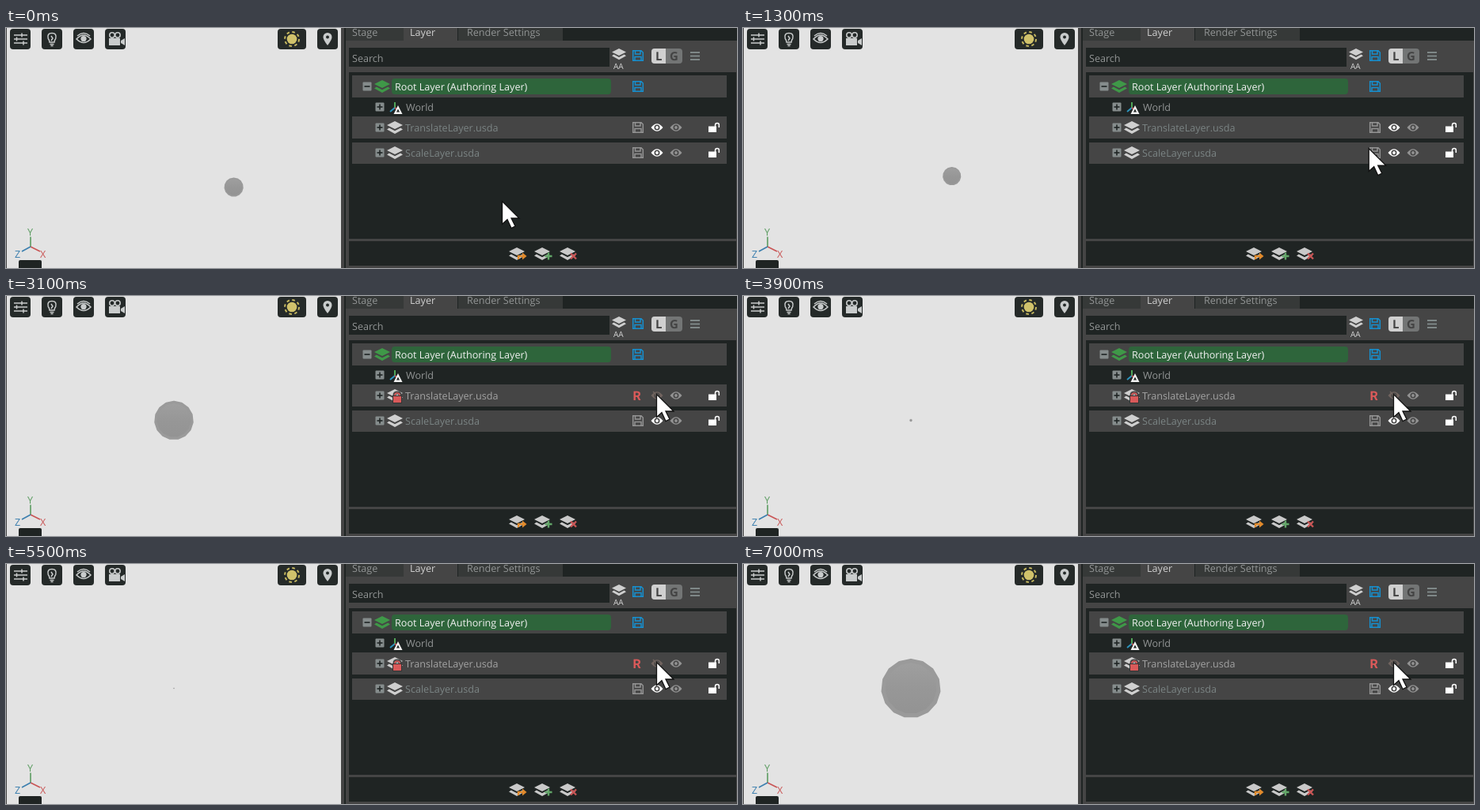
An HTML page that plays this animation: 923 px wide and 304 px high, repeating every 7.1 s.

```html
<!DOCTYPE html>
<html lang="en">
<head>
<meta charset="utf-8">
<title>Layer muting</title>
<style>
html, body { margin: 0; width: 100%; height: 100%; overflow: hidden; background: #454545; }
svg { display: block; }
text { font: 12.6px "Open Sans", "Noto Sans", sans-serif; fill: #929595; text-rendering: geometricPrecision; }
.line { fill: none; stroke: currentColor; stroke-width: 1.5; }
.fill { fill: currentColor; }
.dark { fill: #1f2423; }
.grey { fill: #454545; }
.dim { fill: #7b8484; }
.bold { font-weight: 700; }
</style>
</head>
<body>
<svg width="923" height="304" viewBox="0 0 923 304">
<defs>
  <linearGradient id="shade" x2="0" y2="1">
    <stop stop-color="#9f9f9f"/><stop offset=".5" stop-color="#979797"/><stop offset="1" stop-color="#939393"/>
  </linearGradient>
  <g id="layers" class="fill">
    <path d="M0-9 10-4 0 1-10-4Z"/>
    <path d="M-7.2-.5-10 1.500 0 7 10 1.500 7.200-.5 0 3.200Z"/>
  </g>
  <g id="disk" class="line" stroke-width="1.400">
    <path d="M-6.300-6.300H4L6.300-4V6.300H-6.300ZM-3.500-6V-2H3V-6M-4 6V1.500H4V6"/>
  </g>
  <g id="eye">
    <path class="fill" d="M-7.500 0Q0-9.500 7.500 0Q0 9.500-7.500 0Z"/>
    <circle r="3.500" class="grey"/><circle r="1.900" class="fill"/>
  </g>
  <g id="unlock">
    <path class="fill" d="M-7-1.500H3V6H-7Z"/>
    <path class="line" d="M1.500-1V-3Q1.500-5.500 4-5.500T6.300-3V0" stroke-width="1.800"/>
  </g>
  <g id="minus"><rect x="-5.500" y="-5.500" width="11" height="11" rx="1" fill="#858c8c"/><path d="M-3.500 0h7" stroke="#1f2423" stroke-width="1.600"/></g>
  <g id="plus"><use href="#minus"/><path d="M0-3.500v7" stroke="#1f2423" stroke-width="1.600"/></g>
  <rect id="button" width="26" height="26" rx="4" fill="#252a29"/>
</defs>

<!-- viewport -->
<rect x="1" width="422" height="304" fill="#e3e3e3"/>
<path id="ball" fill="url(#shade)" stroke="#9a9a9a" stroke-width=".14" stroke-linejoin="round"/>
<use href="#button" x="5" y="1"/><use href="#button" x="45" y="1"/>
<use href="#button" x="85" y="1"/><use href="#button" x="125" y="1"/>
<rect x="343" y="1" width="36" height="26" rx="4" fill="#252a29"/><use href="#button" x="393" y="1"/>
<g color="#c9cccc">
  <path class="line" stroke-width="2" d="M10 9h17M10 14h17M10 19h17"/>
  <path class="line" stroke-width="3" d="M20 6.500v5M13.500 11.500v5M22 16.500v5"/>
  <path class="line" d="M55 18Q55 15.500 53.300 13.500Q51.500 6.500 58 6.500T62.700 13.500Q61 15.500 61 18Z"/>
  <path class="line" d="M55.500 20.500h5M56.500 22.500h3M57 10l2 3-2 3"/>
  <path class="line" d="M89 14Q98 4 107 14Q98 23 89 14Z"/>
  <circle class="fill" cx="98" cy="13.500" r="3.600"/><path class="line" d="M90 10Q98 3 106 10"/>
  <circle class="line" cx="134" cy="9" r="3.200"/><circle class="line" cx="141" cy="9" r="3.200"/>
  <path class="fill" d="M130 13h14v9h-14ZM145 16l5-3v9l-5-3Z"/>
  <path class="fill" d="M406 22Q400.500 15 400.500 11.500A5.500 5.500 0 0 1 411.500 11.500Q411.500 15 406 22Z"/>
</g>
<circle cx="406" cy="11.500" r="2" fill="#252a29"/>
<circle cx="361" cy="14" r="6.300" fill="#d0c26b"/>
<circle cx="361" cy="14" r="9" fill="none" stroke="#c4b75f" stroke-width="2" stroke-dasharray="3.600 3.470"/>
<g fill="none" stroke-width="1.600">
  <path d="M31 277V264.500" stroke="#5b9c60"/><path d="M31 277l12 6" stroke="#c95555"/><path d="M31 277l-11 6" stroke="#3c7fae"/>
</g>
<text x="27" y="263" style="fill:#5b9c60">Y</text>
<text x="43" y="291" style="fill:#c95555">X</text>
<text x="11" y="291" style="fill:#3c7fae">Z</text>
<rect class="dark" x="16" y="294" width="29" height="14" rx="2"/>

<!-- panel -->
<rect class="dark" x="427" width="2" height="304"/>
<rect x="429" width="494" height="16" class="dark"/>
<path d="M429 0h73v16h-73ZM571 0h132v16h-132Z" fill="#363938"/>
<rect x="502" width="68" height="17" class="grey"/>
<text x="437" y="10">Stage</text>
<text x="510" y="10" style="fill:#d0d0d0">Layer</text>
<text x="582" y="10">Render Settings</text>
<path class="dark" d="M433 25h329v24h-329ZM433 56h489v211h-489ZM433 270h489v31h-489Z"/>
<text x="437" y="43">Search</text>
<use href="#layers" x="774" y="34" color="#cfcfcf" transform="translate(77.400 3.400) scale(.9)"/>
<text x="767" y="52" style="font-size:10px;fill:#d8d8d8">AA</text>
<use href="#disk" x="798" y="35" color="#1690d0"/>
<rect x="815" y="26" width="39" height="19" rx="4" fill="#737575"/>
<path d="M819 26h14v19h-14q-4 0-4-4v-11q0-4 4-4Z" fill="#d0d0d0"/>
<text x="820" y="41" class="bold" style="font-size:15px;fill:#444">L</text>
<text x="838" y="41" class="bold" style="font-size:15px;fill:#444">G</text>
<path d="M864 31h12M864 35.500h12M864 40h12" stroke="#7f8888" stroke-width="2"/>

<path class="grey" d="M437 60h473v28h-473ZM437 112h473v28h-473ZM437 145h473v27h-473Z"/>
<rect x="487" y="64" width="277" height="20" rx="4" fill="#2e653b"/>
<use href="#minus" x="456" y="74"/><use href="#layers" x="475" y="75" color="#3f9848"/>
<text x="491" y="79" style="fill:#f2f2f2">Root Layer (Authoring Layer)</text>
<use href="#disk" x="798" y="74" color="#1690d0"/>
<use href="#plus" x="472" y="100"/>
<g fill="none" stroke-width="2"><path d="M491 101v-7" stroke="#4fa557"/><path d="M491 101l-6 5" stroke="#2c94bd"/><path d="M491 101l4 3" stroke="#c45454"/></g>
<path d="M495 98l5.500 11h-11Z" fill="#f2f2f2"/><path d="M495 102.500l2 4h-4Z" class="dark"/>
<text x="505" y="105">World</text>

<use href="#plus" x="472" y="126"/><use href="#layers" x="491" y="127" color="#cfcfcf"/>
<text id="name" x="504" y="131">TranslateLayer.usda</text>
<g id="active">
  <use href="#disk" x="798" y="126" color="#949494"/><use href="#eye" x="822" y="126" color="#fff"/>
</g>
<g id="muted">
  <path d="M490.500 128v-2.500q0-3 3.500-3t3.500 3v2.500" fill="none" stroke="#454545" stroke-width="4"/>
  <path d="M491 128v-2.500q0-2.500 3-2.500t3 2.500v2.500" fill="none" stroke="#d95a5a" stroke-width="1.700"/>
  <rect x="488.500" y="126.500" width="11" height="9" fill="#d95a5a" stroke="#333"/>
  <text x="791.500" y="132" class="bold" style="font:700 16px Roboto,sans-serif;fill:#dc5a5a">R</text>
  <use href="#eye" x="822" y="126" color="#70645f"/><path d="M817 121l10 10" stroke="#70645f" stroke-width="1.500"/>
</g>
<use href="#eye" x="846" y="126" color="#929292"/><use href="#unlock" x="894" y="126" color="#fff"/>

<use href="#plus" x="472" y="158"/><use href="#layers" x="491" y="159" color="#cfcfcf"/>
<text class="dim" x="504" y="163" style="fill:#7b8484">ScaleLayer.usda</text>
<use href="#disk" x="798" y="158" color="#949494"/><use href="#eye" x="822" y="158" color="#fff"/>
<use href="#eye" x="846" y="158" color="#929292"/><use href="#unlock" x="894" y="158" color="#fff"/>

<g color="#c9c9c9"><use href="#layers" x="645" y="287"/><use href="#layers" x="677" y="287"/><use href="#layers" x="709" y="287"/></g>
<g fill="none" stroke-width="2.400">
  <path d="M647 293v-4h6" stroke="#e08a2c"/><path d="M652 284.500l5.500 4.500-5.500 4.500Z" fill="#e08a2c"/>
  <path d="M685 284.500v9M680.500 289h9" stroke="#62a668"/>
  <path d="M713 285.500l7 7M720 285.500l-7 7" stroke="#c95555"/>
</g>

<g id="tooltip">
  <rect x="848.500" y="129.500" width="69" height="20" fill="#faf0c8" stroke="#333"/>
  <text x="853" y="144" style="fill:#333">Mute layer</text>
</g>
<path id="cursor" d="M0 0V29L6.500 23 11.500 34 16.500 31.500 11.500 21.500H21.500Z" fill="#fff" stroke="#111" stroke-width="1.300"/>
</svg>
<script>
const [ball, name, active, muted, tooltip, cursor] =
  ["ball", "name", "active", "muted", "tooltip", "cursor"].map(id => document.getElementById(id));
const STEP = 100, STEPS = 71, CYCLE = 16.4;
const show = (el, on) => el.style.display = on ? "" : "none";
const place = (el, x, y, scale = 1) => el.setAttribute("transform", `translate(${x} ${y}) scale(${scale})`);

const corners = Array.from({ length: 15 }, (_, i) => {
  const a = i * Math.PI * 2 / 15 - Math.PI / 2;
  return [Math.cos(a) * .93, Math.sin(a) * .93];
});
ball.setAttribute("d", "M" + corners.join("L") + "Z");

function draw(n) {
  const isMuted = n >= 28;
  // Playback hitches for one step, then carries on.
  const phase = (11.9 + n - (n > 37)) % CYCLE;
  if (isMuted) place(ball, 212, 157.5, phase * 2.46);
  else {
    const depth = 1 - .0113 * phase, dx = 5.5 * phase / depth;
    place(ball, 212 + dx, 157.5 + dx * .583, 10.5 / depth);
  }
  const u = Math.min(1, Math.max(0, (n - 8) / 6.7)), ease = u * u * (3 - 2 * u);
  place(cursor, 626.5 + 195 * ease, 219.5 - 95 * ease * ease);
  show(active, !isMuted);
  show(muted, isMuted);
  show(tooltip, n >= 19 && !isMuted);
  name.style.fill = isMuted ? "#a3a3a3" : "#7b8484";
}

function tick() {
  draw(Math.floor(performance.now() / STEP) % STEPS);
  requestAnimationFrame(tick);
}
tick();
</script>
</body>
</html>
```
